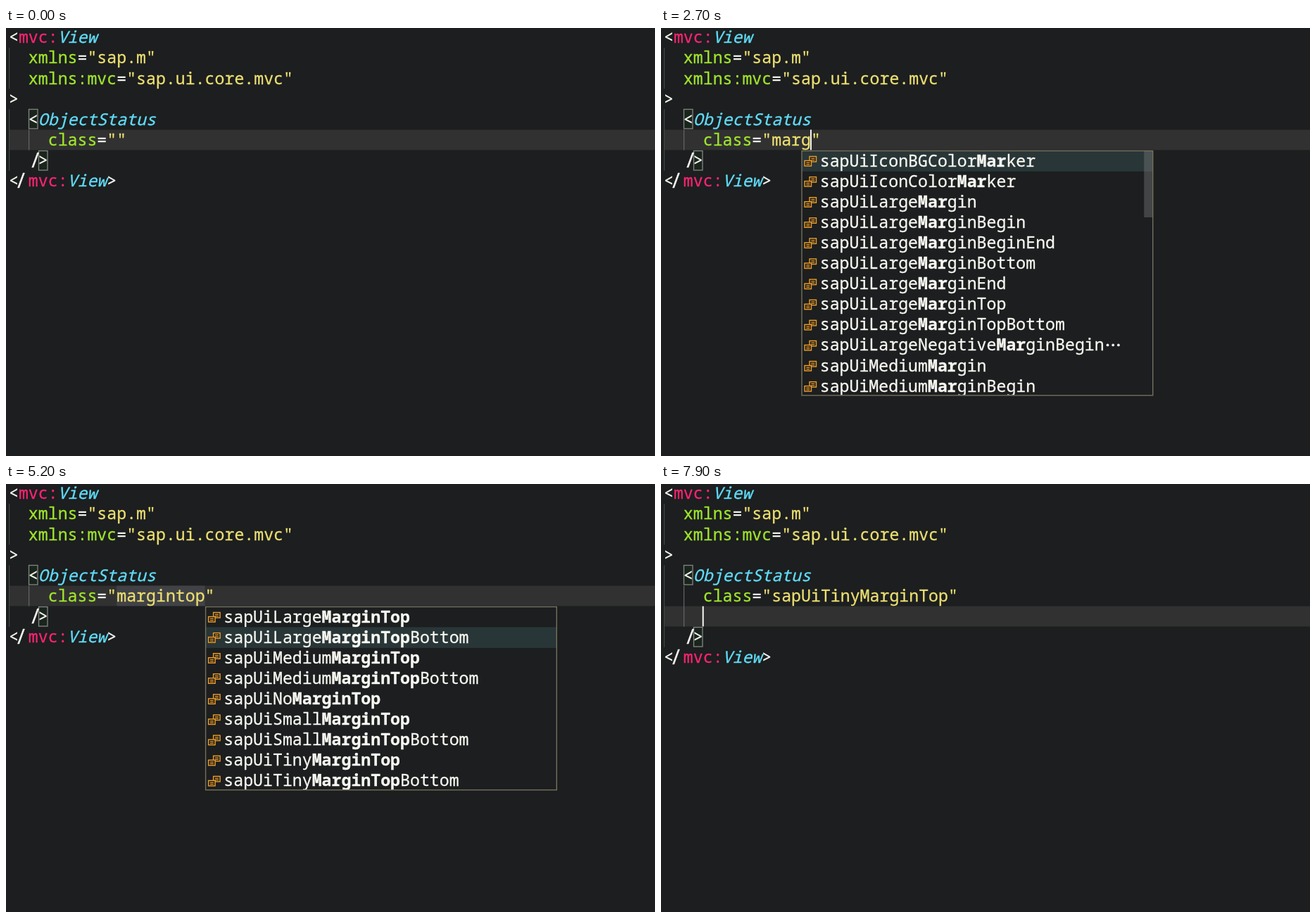
Animation, 922 px wide and 608 px high, one loop 8 s. Source, as an HTML page with a canvas:

```html
<!DOCTYPE html>
<html lang="en">
<head>
<meta charset="utf-8">
<title>Class name completion</title>
<style>
  html, body { margin: 0; width: 100%; height: 100%; overflow: hidden; background: #1c1e1f; }
  canvas { display: block; }
</style>
</head>
<body>
<canvas id="stage" width="922" height="608"></canvas>
<script>
const ctx = document.getElementById('stage').getContext('2d');
const LOOP = 8000, W = 13.93, ROW = 29.1, LEFT = 4, BASE = 22.3, SIZE = 23.2;
const FAMILY = '"Noto Sans Mono", "DejaVu Sans Mono", monospace';
const COLOR = {
  bg: '#1c1e1f', line: '#313131', word: '#414246', white: '#f8f8f2',
  pink: '#f92472', blue: '#60dcf8', green: '#a0e52c', yellow: '#ecdf70',
  guide: '#434545', activeGuide: '#636565', bracket: '#858585',
  border: '#75715e', selected: '#293637', bar: 'rgba(121,121,121,0.42)', icon: '#ee9d28'
};

// Timelines: [start in ms, value]
const TYPED = [[0, ''], [1800, 'm'], [2100, 'ma'], [2200, 'mar'], [2700, 'marg'],
  [3000, 'margi'], [3200, 'margin'], [4400, 'margint'], [4500, 'marginto'],
  [4600, 'margintop'], [6600, 'sapUiTinyMarginTop']];
const QUERY = [[0, ''], [1900, 'm'], [2100, 'ma'], [2200, 'mar'], [2800, 'marg'],
  [3100, 'margi'], [3200, 'margin'], [4400, 'margint'], [4500, 'marginto'],
  [4700, 'margintop'], [6600, '']];
const PICK = [[0, 0], [5200, 1], [5300, 2], [5500, 3], [5600, 4], [5800, 5], [5900, 6], [6000, 7]];
const CARET = [[0, 0], [1000, 1], [1500, 0], [1800, 1], [3700, 0], [4100, 1],
  [5100, 0], [5600, 1], [6100, 0], [6400, 1], [7600, 0], [7800, 1]];
const WORD = [[0, 0], [2400, 1], [2700, 0], [3400, 1], [4400, 0], [4900, 1], [6600, 0], [6900, 1], [7200, 0]];
const BAR = [[0, 1], [3400, 0.5], [3500, 0], [4400, 1]];
const at = (list, t) => list.filter(k => k[0] <= t).pop()[1];

const colX = c => LEFT + c * W;
const rowY = r => r * ROW - 1;

function buildNames() {
  const names = ['sapMSplitContainerMaster', 'sapUiIconBGColorMarker', 'sapUiIconColorMarker'];
  for (const size of ['Large', 'Medium', 'No', 'Responsive', 'Small', 'Tiny']) {
    const ends = size === 'Responsive' ? [''] : size === 'No'
      ? ['', 'Begin', 'Bottom', 'End', 'Top']
      : ['', 'Begin', 'BeginEnd', 'Bottom', 'End', 'Top', 'TopBottom'];
    for (const end of ends) names.push('sapUi' + size + 'Margin' + end);
    if (ends.length === 7) names.push('sapUi' + size + 'NegativeMarginBeginEnd');
  }
  return names;
}
const NAMES = buildNames();
const MORE = { m: 90, ma: 4, mar: 3 };

// Longest contiguous prefix first, the remaining letters in order after it
function match(name, query) {
  const low = name.toLowerCase();
  let n = query.length;
  while (n && low.indexOf(query.slice(0, n)) < 0) n--;
  if (!n) return null;
  const start = low.indexOf(query.slice(0, n));
  const bold = new Set();
  for (let i = 0; i < n; i++) bold.add(start + i);
  let pos = start + n;
  for (const ch of query.slice(n)) {
    pos = low.indexOf(ch, pos);
    if (pos < 0) return null;
    bold.add(pos++);
  }
  return { name, bold, whole: n === query.length };
}

const cache = {};
function search(query) {
  if (!cache[query]) {
    const hits = NAMES.map(n => match(n, query)).filter(Boolean);
    cache[query] = hits.filter(h => h.whole).concat(hits.filter(h => !h.whole));
  }
  return cache[query];
}

function rect(x, y, w, h, color) {
  ctx.fillStyle = color;
  ctx.fillRect(x, y, w, h);
}

function frame(x, y, w, h, color, width) {
  ctx.strokeStyle = color;
  ctx.lineWidth = width;
  ctx.strokeRect(x, y, w, h);
}

// A hairline stroke gives the regular weight its slightly heavier stems
function glyph(ch, x, y, color, style = '', size = SIZE) {
  ctx.font = `${style} ${size}px ${FAMILY}`;
  ctx.fillStyle = ctx.strokeStyle = color;
  ctx.lineWidth = 0.3;
  ctx.fillText(ch, x, y);
  ctx.strokeText(ch, x, y);
}

function text(str, x, y, color, style, bold) {
  [...str].forEach((ch, i) =>
    glyph(ch, x + i * W, y, color, bold && bold.has(i) ? 'bold' : style));
}

// parts: text and colour pairs
function code(row, col, ...parts) {
  for (let i = 0; i < parts.length; i += 2) {
    const color = COLOR[parts[i + 1]];
    text(parts[i], colX(col), rowY(row) + BASE, color, parts[i + 1] === 'blue' ? 'italic' : '');
    col += parts[i].length;
  }
}

// The tall slash of the joined tag signs, moved towards its bracket
function slash(row, col, shift) {
  const size = SIZE * 1.22;
  const x = colX(col) + shift - (size - SIZE) * 0.3;
  glyph('/', x, rowY(row) + BASE + 2, COLOR.white, '', size);
}

function bracketBox(row, col) {
  const x = Math.round(colX(col)) + 0.5, y = Math.round(rowY(row)) + 0.5;
  rect(x, y, 12.5, 27.5, 'rgba(0,100,0,0.1)');
  frame(x, y, 12.5, 27.5, COLOR.bracket, 1.3);
}

function guide(col, from, to, color) {
  rect(Math.round(colX(col)), rowY(from), 1.2, (to - from) * ROW, color);
}

function icon(x, y) {
  const plate = (px, py) => {
    rect(px, py, 9.5, 7.5, COLOR.bg);
    frame(px, py, 9.5, 7.5, COLOR.icon, 1.4);
    rect(px + 2.3, py + 2.2, 5, 1.2, COLOR.icon);
    rect(px + 2.3, py + 4.6, 5, 1.2, COLOR.icon);
  };
  plate(x + 7, y);
  plate(x, y + 6);
}

function popup(query, t) {
  const hits = search(query), count = Math.min(12, hits.length);
  const x = colX(11 + query.length) + 1, y = 174.2, w = 498.7, h = count * ROW - 1.8;
  const pick = at(PICK, t);
  rect(x, y, w, h, COLOR.bg);
  ctx.save();
  ctx.beginPath();
  ctx.rect(x, y, w, h);
  ctx.clip();
  for (let i = 0; i < count; i++) {
    const top = y + i * ROW, hit = hits[i];
    if (i === pick) rect(x, top, w, ROW + 0.5, COLOR.selected);
    icon(x + 4, top + 8.3);
    const long = hit.name.length > 31;
    const label = long ? hit.name.slice(0, 29) : hit.name;
    text(label, x + 25.7, top + BASE, COLOR.white, '', hit.bold);
    if (long) {
      for (let d = 0; d < 3; d++) {
        ctx.beginPath();
        ctx.arc(x + 434.5 + d * 7.7, top + 14.3, 1.9, 0, 7);
        ctx.fill();
      }
    }
  }
  const total = hits.length + (MORE[query] || 0);
  if (total > count) {
    ctx.globalAlpha = at(BAR, t);
    rect(x + w - 12.5, y, 12.5, h * count / total, COLOR.bar);
  }
  ctx.restore();
  frame(x, y + 0.3, w, h, COLOR.border, 1.4);
}

function draw(t) {
  const typed = at(TYPED, t), query = at(QUERY, t);
  const entered = t >= 7800, close = entered ? 7 : 6;
  const active = entered ? 6 : 5;

  rect(0, 0, 922, 608, COLOR.bg);
  rect(4, rowY(active), 918, ROW - 0.3, COLOR.line);
  guide(0, 1, 3, COLOR.guide);
  guide(0, 4, close + 1, COLOR.guide);
  guide(2, 5, close, COLOR.activeGuide);
  if (at(WORD, t)) rect(colX(11), rowY(5), typed.length * W, ROW - 0.3, COLOR.word);
  bracketBox(4, 2);
  bracketBox(close, 3);

  code(0, 0, '<', 'white', 'mvc:', 'pink', 'View', 'blue');
  code(1, 2, 'xmlns', 'green', '=', 'white', '"sap.m"', 'yellow');
  code(2, 2, 'xmlns:mvc', 'green', '=', 'white', '"sap.ui.core.mvc"', 'yellow');
  code(3, 0, '>', 'white');
  code(4, 2, '<', 'white', 'ObjectStatus', 'blue');
  code(5, 4, 'class', 'green', '=', 'white', '"' + typed + '"', 'yellow');
  slash(close, 2, 3);
  code(close, 3, '>', 'white');
  code(close + 1, 0, '<', 'white');
  slash(close + 1, 1, -3.5);
  code(close + 1, 2, 'mvc:', 'pink', 'View', 'blue', '>', 'white');

  if (query) popup(query, t);
  if (at(CARET, t)) {
    const col = entered ? 4 : 11 + typed.length + (t >= 7100 ? 1 : 0);
    rect(colX(col) - 1, rowY(active), 2, ROW - 0.3, COLOR.white);
  }
}

const begin = performance.now();
function tick() {
  draw((performance.now() - begin) % LOOP);
  requestAnimationFrame(tick);
}
tick();
</script>
</body>
</html>
```
